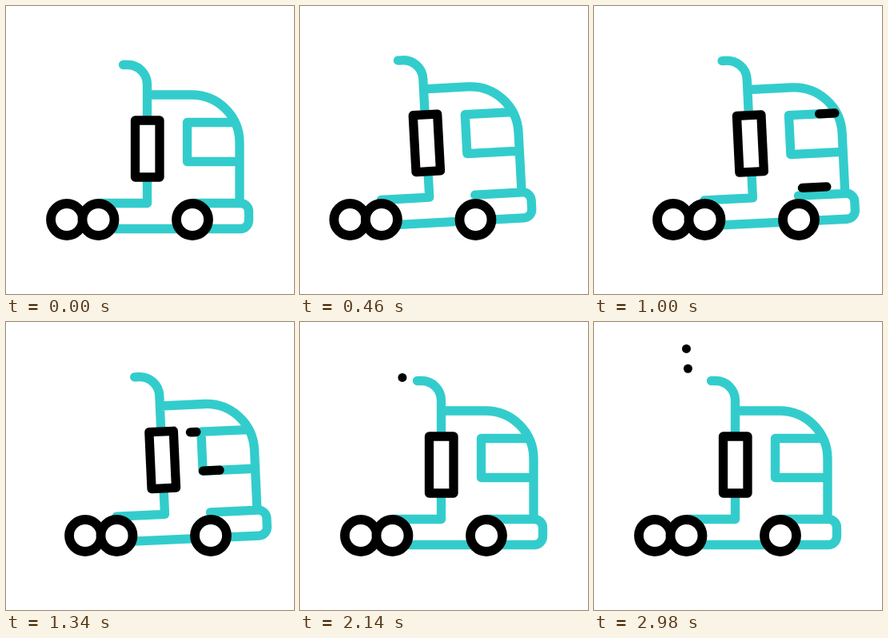
Animation, 360 px wide and 360 px high, one loop 3 s. Source, as an HTML page with a canvas:

```html
<!DOCTYPE html>
<html lang="en">
<head>
<meta charset="utf-8">
<title>Truck</title>
<style>
html, body { margin: 0; width: 100%; height: 100%; overflow: hidden; background: #fff; }
canvas { display: block; width: 360px; height: 360px; }
</style>
</head>
<body>
<canvas id="stage" width="360" height="360"></canvas>
<script>
const ctx = document.getElementById('stage').getContext('2d');
const LOOP = 3000;
const TEAL = '#33cccc';
const PIVOT = { x: 41, y: 265 };

const body = new Path2D([
  'M146.5 73.5 H152 A24.5 24.5 0 0 1 176.5 98 V246.5 H116',
  'M177 111 H232 A60 60 0 0 1 292 171 V246',
  'M285 145.5 H226.5 V194.5 H291',
  'M233.5 246.5 H293 A10.5 10.5 0 0 1 303.5 257 V268 A10.5 10.5 0 0 1 293 278.5 H136'
].join(' '));

// [time, value] keys
const driveKeys = [[0, 0], [400, -15.5], [820, 23], [1350, 23], [1940, 0]];
const tiltKeys = [[0, 0], [400, -3.1], [820, -2.85], [1340, -2.6], [2050, 0]];

const gusts = [
  { y: 145.5, from: 284, to: 213, head: 900, tail: 1010 },
  { y: 194.5, from: 284, to: 205, head: 1073, tail: 1170 },
  { y: 237, from: 284, to: 205, head: 790, tail: 933 }
];
const GUST_TIME = 370;
const puffs = [2012, 2373, 2668];
const PUFF_LIFE = 890;

const clamp = v => Math.min(1, Math.max(0, v));
const ease = u => (1 - Math.cos(Math.PI * u)) / 2;

function track(keys, t) {
  for (let i = 1; i < keys.length; i++) {
    const [t0, a] = keys[i - 1], [t1, b] = keys[i];
    if (t < t1) return a + (b - a) * ease((t - t0) / (t1 - t0));
  }
  return keys[keys.length - 1][1];
}

function drawGust(g, t) {
  const head = clamp((t - g.head) / GUST_TIME);
  const tail = clamp((t - g.tail) / GUST_TIME);
  if (head <= 0 || tail >= 1) return;
  const at = u => g.from + (g.to - g.from) * u;
  ctx.beginPath();
  ctx.moveTo(at(tail), g.y);
  ctx.lineTo(at(head), g.y);
  ctx.stroke();
}

function drawBody(t) {
  ctx.save();
  const lift = -1.8 * Math.sin(Math.PI * clamp((t - 1380) / 600));
  ctx.translate(PIVOT.x, PIVOT.y + lift);
  ctx.rotate(track(tiltKeys, t) * Math.PI / 180);
  ctx.translate(-PIVOT.x, -PIVOT.y);
  ctx.lineWidth = 11.3;
  ctx.strokeStyle = TEAL;
  ctx.stroke(body);
  ctx.strokeStyle = '#000';
  ctx.fillStyle = '#fff';
  ctx.beginPath();
  ctx.rect(161.5, 143, 30.5, 71);
  ctx.fill();
  ctx.stroke();
  gusts.forEach(g => drawGust(g, t));
  ctx.restore();
}

function drawWheel(x) {
  ctx.lineWidth = 11.8;
  ctx.strokeStyle = '#000';
  ctx.fillStyle = '#fff';
  ctx.beginPath();
  ctx.arc(x, 267, 20, 0, Math.PI * 2);
  ctx.fill();
  ctx.stroke();
}

// Smoke follows a quarter arc, then rises straight up.
function drawPuff(age) {
  if (age <= 0 || age >= PUFF_LIFE) return;
  const R = 23, d = age * 0.085;
  const a = Math.min(d / R, Math.PI / 2);
  const x = 138.5 - R * Math.sin(a);
  const y = 49 + R * Math.cos(a) - Math.max(0, d - R * Math.PI / 2);
  const r = 5.5 * clamp(age / 80) * clamp((PUFF_LIFE - age) / 40);
  ctx.fillStyle = '#000';
  ctx.beginPath();
  ctx.arc(x, y, r, 0, Math.PI * 2);
  ctx.fill();
}

function draw(t) {
  ctx.fillStyle = '#fff';
  ctx.fillRect(0, 0, 360, 360);
  ctx.lineCap = ctx.lineJoin = 'round';
  puffs.forEach(start => drawPuff(t - start));
  ctx.save();
  ctx.translate(track(driveKeys, t), 0);
  drawBody(t);
  [76, 115.5, 233].forEach(drawWheel);
  ctx.restore();
}

const begin = performance.now();
function tick() {
  draw((performance.now() - begin) % LOOP);
  requestAnimationFrame(tick);
}
tick();
</script>
</body>
</html>
```
